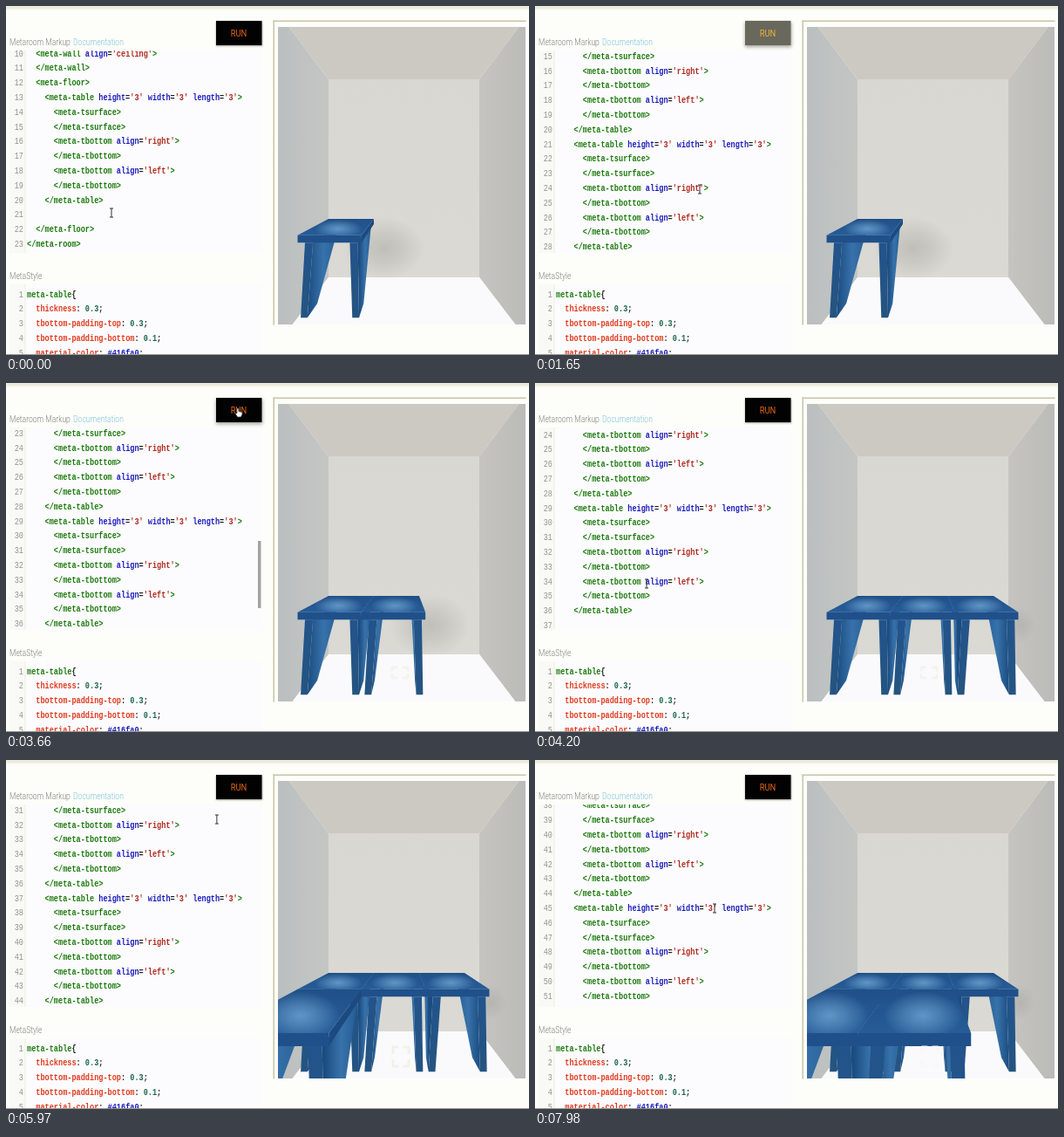
An HTML page with a canvas that plays this animation: 600x400 px, repeating every 8 s.

```html
<!DOCTYPE html>
<html lang="en">
<head>
<meta charset="utf-8">
<title>Room markup editor</title>
<style>
html, body { margin: 0; width: 100%; height: 100%; overflow: hidden; background: #fdfdf9; }
canvas { display: block; width: 600px; height: 400px; }
</style>
</head>
<body>
<canvas id="stage"></canvas>
<script>
const canvas = document.getElementById('stage');
const ctx = canvas.getContext('2d');
const ratio = window.devicePixelRatio || 1;
canvas.width = 600 * ratio;
canvas.height = 400 * ratio;

const LOOP = 8000;
const LINE = 16.8;
const ASPECT = 0.857; // the page is shown slightly narrow
const MONO = '10px "Liberation Mono", monospace';
const BOLD = 'bold ' + MONO;
const INK = { tag: '#1c7a0c', attr: '#1c1cbc', text: '#b02a1e', plain: '#202020', prop: '#e03a1e', num: '#1c6848' };

// Timeline, in ms
const PASTES = [1300, 3250, 5200, 6560];
const RUNS = [2250, 3720, 5760, 6930];
const EDITING = [[900, 2040], [3120, 3500], [4700, 5620], [6480, 6720]];
const SCROLL = [[0, 10], [1290, 10], [1300, 14.81], [2500, 14.81], [2800, 15.7], [3240, 15.7],
  [3250, 22.81], [3850, 22.81], [4100, 23.7], [5190, 23.7], [5200, 30.81], [6100, 30.81],
  [6300, 31.7], [6550, 31.7], [6560, 38.81], [7450, 38.81], [7900, 38.13]];
const POINTER = [[0, 121, 237], [250, 121, 237], [800, 62, 241], [1250, 62, 241], [1650, 189, 210],
  [2100, 267, 33], [2400, 267, 33], [2850, 128, 262], [3200, 128, 262], [3580, 267, 33], [3800, 267, 33],
  [4200, 128, 230], [4650, 60, 277], [5150, 60, 277], [5490, 245, 143], [5680, 262, 36], [5880, 262, 36],
  [6260, 120, 262], [6560, 120, 262], [6790, 260, 39], [7050, 260, 39], [7600, 190, 176], [7900, 206, 170]];

const clamp = v => Math.max(0, Math.min(1, v));
const passed = (times, t) => times.filter(x => x <= t).length;

function track(keys, t) {
  const next = keys.findIndex(k => k[0] > t);
  if (next < 0) return keys[keys.length - 1].slice(1);
  const a = keys[Math.max(0, next - 1)], b = keys[next];
  const u = (t - a[0]) / (b[0] - a[0]);
  const e = u * u * (3 - 2 * u);
  return a.slice(1).map((v, i) => v + (b[i + 1] - v) * e);
}

function rect(x, y, w, h, fill) {
  ctx.fillStyle = fill;
  ctx.fillRect(x, y, w, h);
}

function poly(points, fill) {
  ctx.beginPath();
  points.forEach(p => ctx.lineTo(p[0], p[1]));
  ctx.closePath();
  ctx.fillStyle = fill;
  ctx.fill();
}

function clipped(x, y, w, h, draw) {
  ctx.save();
  ctx.beginPath();
  ctx.rect(x, y, w, h);
  ctx.clip();
  draw();
  ctx.restore();
}

function label(text, x, y, font, fill, align = 'left') {
  ctx.save();
  ctx.translate(x, y);
  ctx.scale(ASPECT, 1);
  ctx.font = font;
  ctx.fillStyle = fill;
  ctx.textAlign = align;
  ctx.textBaseline = 'middle';
  ctx.fillText(text, 0, 0);
  ctx.restore();
}

// ---- code panels ----
const TABLE = [
  "    <meta-table height='3' width='3' length='3'>",
  '      <meta-tsurface>', '      </meta-tsurface>',
  "      <meta-tbottom align='right'>", '      </meta-tbottom>',
  "      <meta-tbottom align='left'>", '      </meta-tbottom>',
  '    </meta-table>'];
const HEAD = ["  <meta-wall align='ceiling'>", '  </meta-wall>', '  <meta-floor>'];
const TAIL = ['', '  </meta-floor>', '</meta-room>'];
const STYLE = ['meta-table{', '  thickness: 0.3;', '  tbottom-padding-top: 0.3;',
  '  tbottom-padding-bottom: 0.1;', '  material-color: #416fa0;'];

function markupLine(n, tables) {
  if (n < 13) return HEAD[n - 10];
  const i = n - 13;
  return i < tables * 8 ? TABLE[i % 8] : TAIL[i - tables * 8];
}

function markupInk(s) {
  if (/^[<>]/.test(s)) return INK.tag;
  if (s[0] === "'") return INK.text;
  return s === '=' ? INK.plain : INK.attr;
}

function styleInk(s) {
  if (/^(thickness|tbottom|material)/.test(s)) return INK.prop;
  if (s === 'meta-table') return INK.tag;
  if (s[0] === '#') return INK.attr;
  return /^\d/.test(s) ? INK.num : INK.plain;
}

function codeLine(n, text, y, pattern, ink) {
  label(n, 20, y, MONO, '#94948f', 'right');
  for (const m of text.matchAll(pattern)) {
    label(m[0], 24 + m.index * 6 * ASPECT, y, BOLD, ink(m[0]));
  }
}

function panel(y, h, draw) {
  rect(4, y, 290, h, '#fcfcfe');
  rect(4, y, 18, h, '#f9f9f6');
  rect(21.5, y, 1, h, '#eeeed8');
  clipped(4, y, 290, h, draw);
}

function editors(t) {
  const light = '300 10px Roboto, sans-serif';
  label('Metaroom Markup', 4, 42.5, light, '#82827e');
  label('Documentation', 77, 42.5, light, '#7cc4dc');
  label('MetaStyle', 4, 310, light, '#82827e');

  const tables = 1 + passed(PASTES, t);
  const top = track(SCROLL, t)[0];
  panel(51, 232, () => {
    for (let n = Math.floor(top); n < top + 13.6; n++) {
      const text = markupLine(n, tables);
      if (text !== undefined) {
        codeLine(n, text, 55 + (n - top) * LINE, /<\/?[\w-]+>?|>|'[^']*'|=|[\w-]+/g, markupInk);
      }
    }
    const bar = clamp((t - 3240) / 30) * clamp((3800 - t) / 120);
    if (bar) {
      ctx.globalAlpha = bar;
      rect(289, 181, 3.5, 77, '#a3a3a0');
      ctx.globalAlpha = 1;
    }
  });
  panel(319, 81, () => STYLE.forEach((text, i) =>
    codeLine(i + 1, text, 331 + i * LINE, /#\w+|\d\.\d|[a-z-]+|[{:;]/g, styleInk)));
}

function mix(a, b, u) {
  return `rgb(${a.map((v, i) => Math.round(v + (b[i] - v) * u))})`;
}

function runButton(t, hover) {
  const grey = Math.max(...EDITING.map(([a, b]) => clamp((t - a) / 120) * clamp((b - t) / 120)));
  ctx.save();
  ctx.shadowColor = 'rgba(50,50,40,0.45)';
  ctx.shadowBlur = (hover || grey ? 4 : 2) * ratio;
  ctx.shadowOffsetY = (hover || grey ? 2 : 1) * ratio;
  rect(241, 17, 52.5, 28, mix([2, 2, 2], [104, 104, 92], grey));
  ctx.restore();
  label('RUN', 267, 31.5, '11px Roboto, sans-serif', mix([226, 100, 24], [236, 178, 62], grey), 'center');
}

// ---- room: s is the perspective scale, 1 at the back wall ----
const CX = 456.5, CY = 198, HALF = 86.5;
const FLOOR = 113, CEIL = -114, TOP = 46, APRON = 52, WIDE = 52;
const at = (x, y, s) => [CX + x * s, CY + y * s];

function shade(p, q, stops) {
  const g = ctx.createLinearGradient(...p, ...q);
  stops.forEach((c, i) => g.addColorStop(i / (stops.length - 1), c));
  return g;
}

function glow(x, y, rx, ry, rgb, alpha) {
  ctx.save();
  ctx.translate(x, y);
  ctx.scale(rx, ry);
  const g = ctx.createRadialGradient(0, 0, 0, 0, 0, 1);
  g.addColorStop(0, `rgba(${rgb},${alpha})`);
  g.addColorStop(0.45, `rgba(${rgb},${alpha * 0.6})`);
  g.addColorStop(1, `rgba(${rgb},0)`);
  ctx.fillStyle = g;
  ctx.fillRect(-1, -1, 2, 2);
  ctx.restore();
}

// A side board, tapering in depth towards the floor
function board(xTop, xBottom, s0, s1) {
  const thick = 6.5, foot = 5.5;
  const inner = xTop < 0;
  const a = xTop + (inner ? thick : 0), b = xBottom + (inner ? foot : 0);
  const heel = s0 + (s1 - s0) * 0.65;
  const side = [at(a, APRON, s0), at(a, APRON, s1), at(b, FLOOR, s1), at(b, FLOOR, heel)];
  poly(side, shade(side[0], [side[2][0], side[0][1]], ['#235c92', '#3872aa', '#1a4c80']));
  const front = [at(xTop, APRON, s1), at(xTop + thick, APRON, s1),
    at(xBottom + foot, FLOOR, s1), at(xBottom, FLOOR, s1)];
  poly(front, shade(front[0], front[3], ['#22548c', '#255480']));
}

function table(x, s0, s1) {
  const r = x + WIDE;
  const legs = [[x + 6, x + 2.5], [r - 9.5, r - 7.5]];
  if (x + WIDE / 2 > 0) legs.reverse();
  legs.forEach(l => board(...l, s0, s1));

  const edge = r < 0 ? r : x > 0 ? x : null;
  if (edge !== null) {
    poly([at(edge, TOP, s0), at(edge, TOP, s1), at(edge, APRON, s1), at(edge, APRON, s0)], '#1c4a80');
  }
  const a = at(x, TOP, s0), b = at(r, TOP, s0), c = at(r, TOP, s1), d = at(x, TOP, s1);
  ctx.save();
  poly([a, b, c, d], shade(a, [a[0], d[1]], ['#205088', '#275c98']));
  ctx.clip();
  const mid = s0 + (s1 - s0) * 0.6;
  const p = at(x + WIDE / 2 + (s0 > 1 ? 3 : 0), TOP, mid);
  glow(p[0], p[1], 22 * mid, (d[1] - a[1]) * 0.55, '106,160,206', 0.85);
  ctx.restore();
  poly([d, c, at(r, APRON, s1), at(x, APRON, s1)], '#20508a');
}

function brackets(x, y, w, h, color) {
  ctx.strokeStyle = color;
  ctx.lineWidth = 3;
  ctx.lineJoin = 'round';
  ctx.beginPath();
  for (const i of [-1, 1]) {
    for (const j of [-1, 1]) {
      ctx.moveTo(x + i * w * 0.3, y + j * h);
      ctx.lineTo(x + i * w, y + j * h);
      ctx.lineTo(x + i * w, y + j * h * 0.3);
    }
  }
  ctx.stroke();
}

function room(t) {
  rect(306.5, 16.5, 290, 1.5, '#c6c6a8');
  rect(306.5, 16.5, 1.5, 349, '#c6c6a8');
  rect(308, 18, 289, 347, '#fdfdfa');
  const count = 1 + passed(RUNS, t);
  clipped(312, 24, 284, 341, () => {
    const far = 2;
    const wall = (pts, fill) => poly(pts.map(p => at(...p)), fill);
    wall([[-HALF, CEIL, 1], [HALF, CEIL, 1], [HALF, CEIL, far], [-HALF, CEIL, far]], '#cbc9c1');
    wall([[-HALF, CEIL, 1], [-HALF, FLOOR, 1], [-HALF, FLOOR, far], [-HALF, CEIL, far]],
      shade([312, 0], [370, 0], ['#babfbf', '#c4c6c4']));
    wall([[HALF, CEIL, 1], [HALF, FLOOR, 1], [HALF, FLOOR, far], [HALF, CEIL, far]],
      shade([543, 0], [596, 0], ['#c5c4c0', '#bbbbb8']));
    wall([[-HALF, FLOOR, 1], [HALF, FLOOR, 1], [HALF, FLOOR, far], [-HALF, FLOOR, far]], '#fafafc');
    wall([[-HALF, CEIL, 1], [HALF, CEIL, 1], [HALF, FLOOR, 1], [-HALF, FLOOR, 1]],
      shade([0, 84], [0, 311], ['#d8d7d1', '#dad9d3']));

    const right = CX - HALF + WIDE * Math.min(count, 3);
    if (count < 3) glow(right + 12, 278, 46, 36, '130,130,124', 0.3);
    else glow(556, 278, 18, 20, '130,130,124', 0.2);

    const row = (n, s0, s1) => {
      const xs = Array.from({ length: n }, (_, i) => -HALF + i * WIDE);
      xs.sort((a, b) => Math.abs(b + WIDE / 2) - Math.abs(a + WIDE / 2));
      xs.forEach(x => table(x, s0, s1));
    };
    row(Math.min(count, 3), 1, 1.41);
    if (count > 1 && count < 4) brackets(452, 332, 9, 6, '#f3f3ec');
    if (count > 3) {
      row(count - 3, 1.41, 2.5);
      brackets(453, 340, 9, 11, count > 4 ? '#f8f8f8' : '#f1f1e8');
    }
  });
}

// ---- pointer ----
function pointer(x, y, hover) {
  ctx.save();
  ctx.translate(x, y);
  ctx.lineWidth = 1;
  ctx.strokeStyle = '#303030';
  if (hover) {
    ctx.fillStyle = '#fff';
    ctx.beginPath();
    [[-2, -4], [0, -4], [0, -0.5], [4, 0.5], [4, 3], [2.5, 6], [-1.5, 6], [-4, 2], [-2, 1.5]]
      .forEach(p => ctx.lineTo(...p));
    ctx.closePath();
    ctx.fill();
    ctx.lineWidth = 0.7;
    ctx.stroke();
  } else {
    ctx.beginPath();
    ctx.moveTo(-2, -5); ctx.lineTo(2, -5);
    ctx.moveTo(0, -5); ctx.lineTo(0, 5);
    ctx.moveTo(-2, 5); ctx.lineTo(2, 5);
    ctx.stroke();
  }
  ctx.restore();
}

function draw(now) {
  const t = now % LOOP;
  ctx.setTransform(ratio, 0, 0, ratio, 0, 0);
  rect(0, 0, 600, 400, '#fdfdf9');
  rect(0, 0, 600, 3, '#ececdc');
  rect(0, 3, 600, 1.5, '#f6f6ea');
  const [x, y] = track(POINTER, t);
  const hover = x > 241 && x < 293 && y > 17 && y < 45;
  editors(t);
  runButton(t, hover);
  room(t);
  pointer(x, y, hover);
  rect(0, 399, 600, 1, '#96968e');
}

let start;
function tick(now) {
  start ??= now;
  draw(now - start);
  requestAnimationFrame(tick);
}
requestAnimationFrame(tick);
</script>
</body>
</html>
```
